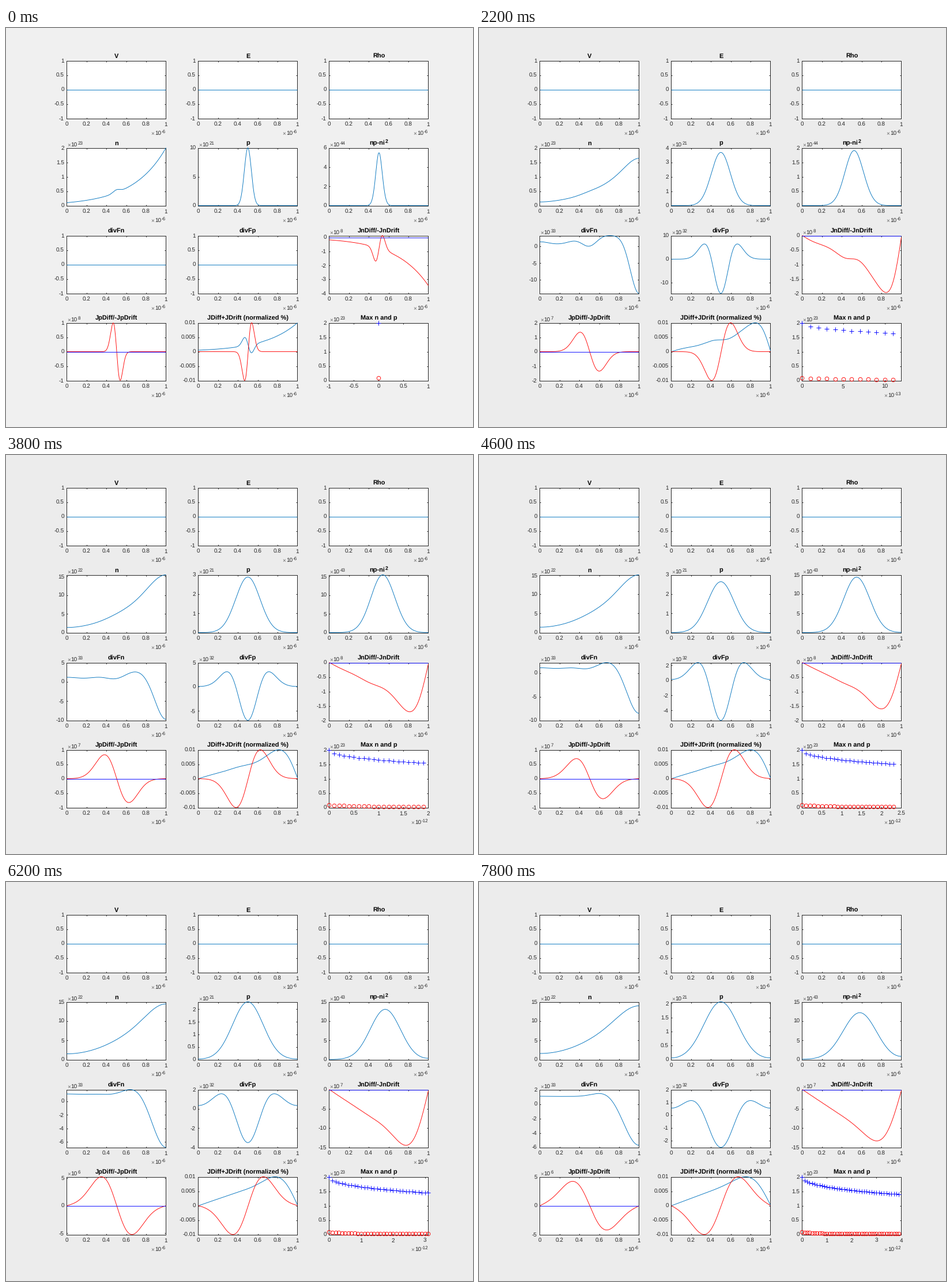
These frames come from a looping animation (810 by 691 pixels, 8000 ms). A matplotlib script:

```python
import math
import numpy as np
import matplotlib.pyplot as plt
from matplotlib.animation import FuncAnimation
from matplotlib.patches import Rectangle

W, H, DPI = 810, 691, 100
PT = 72 / DPI
FRAMES, INTERVAL = 40, 200
DARK, TEAL, RED, BLUE = "#262626", "#0072bd", "#ff0000", "#0000ff"
# Just off the pixel centres, so that straight lines snap to the right pixel.
LEFT, TOP = (105.49, 333.49, 560.49), (56.51, 207.51, 359.51, 510.51)
BOX_W, BOX_H = 172, 100

plt.rcParams["font.family"] = "Liberation Sans"
plt.rcParams["text.hinting"] = "none"

# Carrier diffusion between reflecting walls, x in micrometres.
D = 0.14 * 0.02585
Q = 1.602e-19
DT = 1e-13
MODES = np.arange(80)[:, None] * math.pi
X = np.linspace(0, 1, 301)
X_FACE = np.clip(X - 0.003, 0, 1)


def p_start(x):
    return 1e22 * np.exp(-((x - 0.5) / 0.05) ** 2)


def n_start(x):
    return 1e22 * 20 ** x + p_start(x)


def coefficients(f):
    mid = (np.arange(4000) + 0.5) / 4000
    c = 2 * np.mean(f(mid) * np.cos(MODES * mid), axis=1)
    c[0] /= 2
    return c[:, None]


def evolve(f, coef, k):
    """Density, slope and D times curvature after k time steps."""
    if k == 0:
        h = 1e-5
        slope = (f(X_FACE + h) - f(X_FACE - h)) / (2 * h) * 1e6
        return f(X), slope, 0 * X
    c = coef * np.exp(-D * MODES ** 2 * k * DT * 1e12)
    dens = np.maximum((c * np.cos(MODES * X)).sum(0), 0)
    slope = -(c * MODES * np.sin(MODES * X_FACE)).sum(0) * 1e6
    curve = -D * (c * MODES ** 2 * np.cos(MODES * X)).sum(0) * 1e12
    return dens, slope, curve


NC, PC = coefficients(n_start), coefficients(p_start)
STATES = [(evolve(n_start, NC, k), evolve(p_start, PC, k)) for k in range(FRAMES)]
N_MAX = [n[0].max() for n, p in STATES]
P_MAX = [p[0].max() for n, p in STATES]


def auto_limits(lo, hi, density=2.35):
    """Round out to a nice step, but stay tight if that wastes much room."""
    span = hi - lo
    if span == 0:
        return -1.0, 1.0
    raw = span / density
    base = 10.0 ** math.floor(math.log10(raw))
    m = raw / base
    step = base * (1 if m < 2 ** 0.5 else 2 if m < 10 ** 0.5 else 5 if m < 50 ** 0.5 else 10)
    low = math.floor(lo / step + 1e-6) * step
    high = math.ceil(hi / step - 1e-6) * step
    room = 0.25 * span * (1 + 1e-6)
    return (low if lo - low <= room else lo), (high if high - hi <= room else hi)


def ticks_for(lo, hi, most):
    base = 10.0 ** math.floor(math.log10((hi - lo) / most))
    step = next(base * m for m in (1, 2, 5, 10, 20) if (hi - lo) / (base * m) <= most)
    first = math.ceil(lo / step - 1e-6)
    last = math.floor(hi / step + 1e-6)
    return np.arange(first, last + 1) * step


def exponent_for(ticks):
    top = np.abs(ticks).max()
    e = math.floor(math.log10(top) + 1e-9)
    if -4 < e < 4:
        return 0
    m = ticks / 10.0 ** e
    broken = np.any(np.abs(m - np.round(m)) > 1e-6)
    if len(ticks) < 5 and (broken or (len(ticks) == 3 and np.abs(m).max() < 2.1)):
        e -= 1
    return e


fig = plt.figure(figsize=(W / DPI, H / DPI), dpi=DPI)
ax = fig.add_axes([0, 0, 1, 1])


def text(x, y, s, size=10, ha="left", weight="normal", color=DARK):
    return ax.text(x, y, s, fontsize=size * PT, ha=ha, va="baseline",
                   weight=weight, color=color, zorder=3)


def line(x, y, color, width=0.9, z=2):
    ax.plot(x, y, color=color, lw=width * PT, zorder=z, solid_capstyle="butt")


def power(x, y, e):
    """Write x10^e, with the left end of the exponent at x."""
    text(x - 18.5, y, "×", color="#6a6a6a")
    text(x - 12, y, "10")
    text(x, y - 4, str(e), 8)


class Panel:
    def __init__(self, col, row, title, xlim, ylim):
        self.x0, self.y0 = LEFT[col], TOP[row]
        self.x1, self.y1 = self.x0 + BOX_W, self.y0 + BOX_H
        self.xlim, self.ylim = xlim, ylim
        ax.add_patch(Rectangle((self.x0, self.y0), BOX_W, BOX_H, fc="white", ec="none", zorder=0.5))
        line([self.x0, self.x1, self.x1, self.x0, self.x0],
             [self.y0, self.y0, self.y1, self.y1, self.y0], DARK, 1, 1)
        self.heading(title)
        self.x_axis()
        self.y_axis()

    def heading(self, title):
        mid, base = (self.x0 + self.x1) / 2, self.y0 - 5
        if title.endswith("^2"):
            text(mid - 2.5, base, title[:-2], 11, "center", "bold", "black")
            text(mid + 11, base - 4, "2", 8.8, "left", "bold", "black")
        else:
            text(mid, base, title, 11, "center", "bold", "black")

    def px(self, x):
        a, b = self.xlim
        return self.x0 + (np.asarray(x) - a) / (b - a) * BOX_W

    def py(self, y):
        a, b = self.ylim
        return self.y1 - (np.asarray(y) - a) / (b - a) * BOX_H

    def x_axis(self):
        ticks = ticks_for(*self.xlim, 5.01)
        e = exponent_for(ticks)
        for t in ticks:
            x = self.px(t)
            line([x, x], [self.y1, self.y1 - 2], DARK, 1, 1)
            line([x, x], [self.y0, self.y0 + 2], DARK, 1, 1)
            text(x - 0.3, self.y1 + 13.5, "%g" % (round(t / 10.0 ** e, 6) + 0.0), ha="center")
        if e:
            power(self.x1 - (7.5 if e > -10 else 11.5), self.y1 + 29.5, e)

    def y_axis(self):
        ticks = ticks_for(*self.ylim, 4.75)
        e = exponent_for(ticks)
        for t in ticks:
            y = self.py(t)
            line([self.x0, self.x0 + 2], [y, y], DARK, 1, 1)
            line([self.x1, self.x1 - 2], [y, y], DARK, 1, 1)
            text(self.x0 - 4.6, y + 3.5, "%g" % (round(t / 10.0 ** e, 6) + 0.0), ha="right")
        if e:
            power(self.x0 + 19, self.y0 - 1.5, e)

    def curve(self, y, color=TEAL):
        line(self.px(X * 1e-6), self.py(y), color)

    def marks(self, x, y, shape, size, color):
        ax.plot(self.px(x), self.py(y), ls="none", marker=shape, ms=size * PT, mec=color,
                mfc="none", mew=0.9 * PT, zorder=4, clip_on=False)


def profile(col, row, title, *curves, ylim=None):
    ylim = ylim or auto_limits(min(y.min() for y, _ in curves), max(y.max() for y, _ in curves))
    panel = Panel(col, row, title, (0, 1e-6), ylim)
    for y, color in curves:
        panel.curve(y, color)


def draw(k):
    ax.clear()
    ax.set(xlim=(0, W), ylim=(H, 0))
    ax.axis("off")
    shade = "#f0f0f0" if k == 0 else "#ececec"
    fig.set_facecolor(shade)
    ax.add_patch(Rectangle((0, 0), W, H, fc=shade, ec="none", zorder=0))

    (n, dn, div_n), (p, dp, div_p) = STATES[k]
    zero = 0 * X
    for col, name in enumerate(("V", "E", "Rho")):
        profile(col, 0, name, (zero, TEAL))

    profile(0, 1, "n", (n, TEAL))
    profile(1, 1, "p", (p, TEAL))
    profile(2, 1, "np-ni^2", (n * p, TEAL))

    profile(0, 2, "divFn", (div_n, TEAL))
    profile(1, 2, "divFp", (div_p, TEAL))
    profile(2, 2, "JnDiff/-JnDrift", (-Q * D * dn, RED), (zero, BLUE))

    profile(0, 3, "JpDiff/-JpDrift", (Q * D * dp, RED), (zero, BLUE))
    profile(1, 3, "JDiff+JDrift (normalized %)",
            (0.01 * dn / np.abs(dn).max(), TEAL),
            (-0.01 * dp / np.abs(dp).max(), RED), ylim=(-0.01, 0.01))

    times = np.arange(k + 1) * DT
    peak = Panel(2, 3, "Max n and p", auto_limits(0, k * DT, 4.08), (0, 2e23))
    peak.marks(times, N_MAX[:k + 1], "+", 7.5, BLUE)
    peak.marks(times, P_MAX[:k + 1], "o", 6.5, RED)
    return []


anim = FuncAnimation(fig, draw, frames=FRAMES, interval=INTERVAL,
                     init_func=lambda: draw(0), repeat=True, repeat_delay=0)
plt.show()
```
